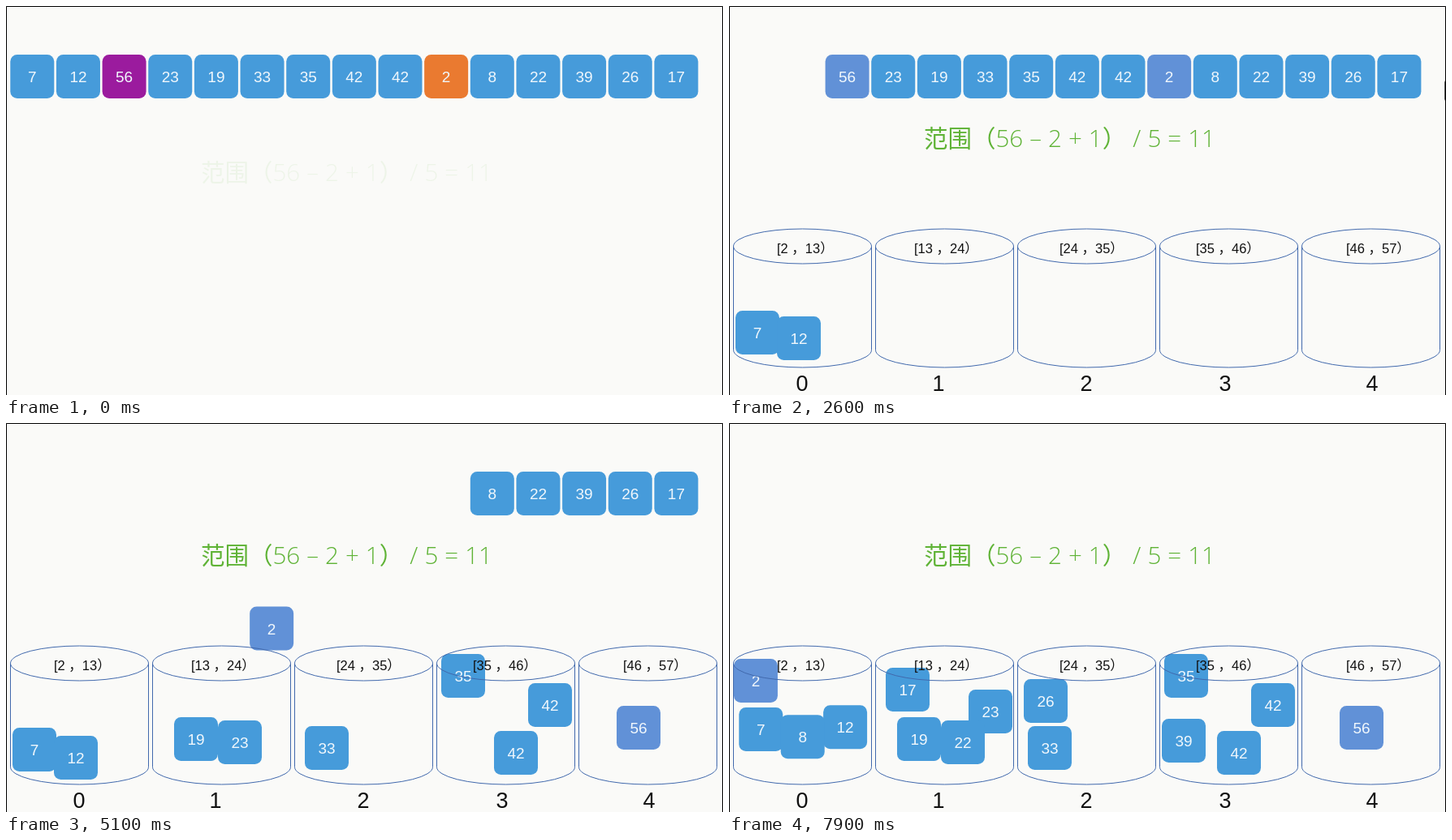
These frames come from a looping animation (883x480 px, 8000 ms). An HTML page:

```html
<!DOCTYPE html>
<html lang="zh">
<head>
<meta charset="utf-8">
<title>Bucket sort</title>
<style>
html, body { margin: 0; width: 100%; height: 100%; overflow: hidden; background: #fafaf8; }
svg { display: block; width: 883px; height: 480px; }
text { font-family: "Liberation Sans", "Noto Sans CJK SC", "Noto Sans CJK", sans-serif; white-space: pre; }
#formula text { font: 300 29.5px "Open Sans", "Noto Sans CJK SC", "Noto Sans CJK", sans-serif; fill: #5fb336; word-spacing: .4px; }
#tiles text { font-size: 19px; fill: #f0f7fc; text-anchor: middle; }
#buckets text { font-size: 16.5px; fill: #111; }
#buckets .index { font-size: 27px; text-anchor: middle; }
#buckets path { fill: none; stroke: #4169ad; }
</style>
</head>
<body>
<svg viewBox="0 0 883 480">
  <rect width="883" height="480" fill="#fafaf8"/>
  <g id="formula"><text x="240" y="174">范围（56 – 2 + 1） / 5 = 11</text></g>
  <g id="tiles"></g>
  <g id="buckets"></g>
  <rect id="handle" x="881.5" y="92.5" width="8" height="24" rx="1" fill="#fff" stroke="#555"/>
  <path d="M.5 480V.5H882.5V480" fill="none" stroke="#000"/>
</svg>
<script>
const LOOP = 8000, SORT_START = 1952, SWAP_TIME = 268, RETURN_START = 7852, RETURN_TIME = 246;
const MIN = 2, RANGE = 11;
const BLUE = [70, 155, 218], PERIWINKLE = [97, 145, 215];
const MARKS = { 2: [234, 122, 48], 56: [155, 27, 158] };

const byId = id => document.getElementById(id);
const ramp = (t, start, duration) => Math.min(1, Math.max(0, (t - start) / duration));
const ease = t => t < .5 ? 2 * t * t : 1 - 2 * (1 - t) * (1 - t);
const mix = (a, b, k) => a + (b - a) * k;
const slot = i => [32.3 + 56.65 * i, 87];
const bucketOf = value => Math.floor((value - MIN) / RANGE);

function add(parent, name, attrs, content = "") {
  const el = document.createElementNS("http://www.w3.org/2000/svg", name);
  for (const key in attrs) el.setAttribute(key, attrs[key]);
  el.textContent = content;
  parent.append(el);
  return el;
}

// Buckets with the x of their range label and index
const buckets = byId("buckets");
[[59, 90], [228, 258], [407, 440], [575, 611], [760, 792]].forEach(([labelX, indexX], i) => {
  const left = 5.5 + 175 * i, right = left + 170, low = MIN + RANGE * i;
  const arc = `A85 21.5 0 0 `;
  add(buckets, "path", {
    d: `M${left} 296.5${arc}1 ${right} 296.5${arc}1 ${left} 296.5V424.5${arc}0 ${right} 424.5V296.5`
  });
  add(buckets, "text", { x: labelX, y: 305 }, `[${low} ，${low + RANGE}）`);
  add(buckets, "text", { x: indexX, y: 475, class: "index" }, i);
});

// Value and landing point of each tile
const tiles = [
  [7, 35, 403], [12, 86, 413], [56, 779, 376], [23, 234, 390], [19, 288, 394],
  [33, 395, 401], [35, 563, 312], [42, 628, 407], [42, 670, 348], [2, 138, 400],
  [8, 138, 400], [22, 322, 356], [39, 560, 392], [26, 390, 343], [17, 220, 329]
].map(([value, x, y], i) => {
  const g = add(byId("tiles"), "g", {});
  const box = add(g, "rect", { x: -27, y: -27, width: 54, height: 54, rx: 8.5, fill: `rgb(${BLUE})` });
  add(g, "text", { y: 7 }, value);
  return { value, g, box, landing: [x, y], at: slot(i), moves: [] };
});

function move(tile, start, duration, to) {
  tile.moves.push({ start, duration, from: tile.at, to });
  tile.at = to;
}

// A tile that lands right of one larger tile swaps with it;
// right of several, it climbs above the leftmost.
function schedule() {
  let time = SORT_START;
  const placed = [];
  tiles.forEach((tile, i) => {
    const flight = i < 6 ? 336 : i < 12 ? 246 : 375;
    move(tile, time, flight, tile.landing);
    time += flight;
    const larger = placed.filter(other => bucketOf(other.value) === bucketOf(tile.value)
      && other.value > tile.value && other.at[0] < tile.at[0]);
    if (larger.length) {
      const [x, y] = larger[0].at;
      if (larger.length === 1) move(larger[0], time, SWAP_TIME, tile.at);
      move(tile, time, SWAP_TIME, larger.length === 1 ? [x, y] : [x - 2, y - 65]);
      time += SWAP_TIME;
    }
    placed.push(tile);
  });
  tiles.filter(tile => bucketOf(tile.value) === 0)
    .sort((a, b) => a.value - b.value)
    .forEach((tile, i) => move(tile, RETURN_START, RETURN_TIME, slot(i)));
}
schedule();

function position({ moves }, t) {
  const { start, duration, from, to } = moves.findLast(m => m.start <= t) || moves[0];
  const k = ease(ramp(t, start, duration));
  return from.map((v, axis) => mix(v, to[axis], k));
}

function floatIn(el, k) {
  el.setAttribute("opacity", k);
  el.setAttribute("transform", `translate(0 ${45 * (1 - k)})`);
}

function render(t) {
  floatIn(byId("formula"), ramp(t, -50, 700));
  floatIn(buckets, ramp(t, 1000, 700));
  const fade = ramp(t, 550, 450);
  for (const tile of tiles) {
    tile.g.setAttribute("transform", `translate(${position(tile, t)})`);
    const mark = MARKS[tile.value];
    if (mark) tile.box.setAttribute("fill", `rgb(${mark.map((c, n) => Math.round(mix(c, PERIWINKLE[n], fade)))})`);
  }
  byId("handle").setAttribute("visibility", t >= 2000 && t < 4450 ? "visible" : "hidden");
}

const begin = performance.now();
function frame(now) {
  render(Math.max(0, now - begin) % LOOP);
  requestAnimationFrame(frame);
}
render(0);
requestAnimationFrame(frame);
</script>
</body>
</html>
```
